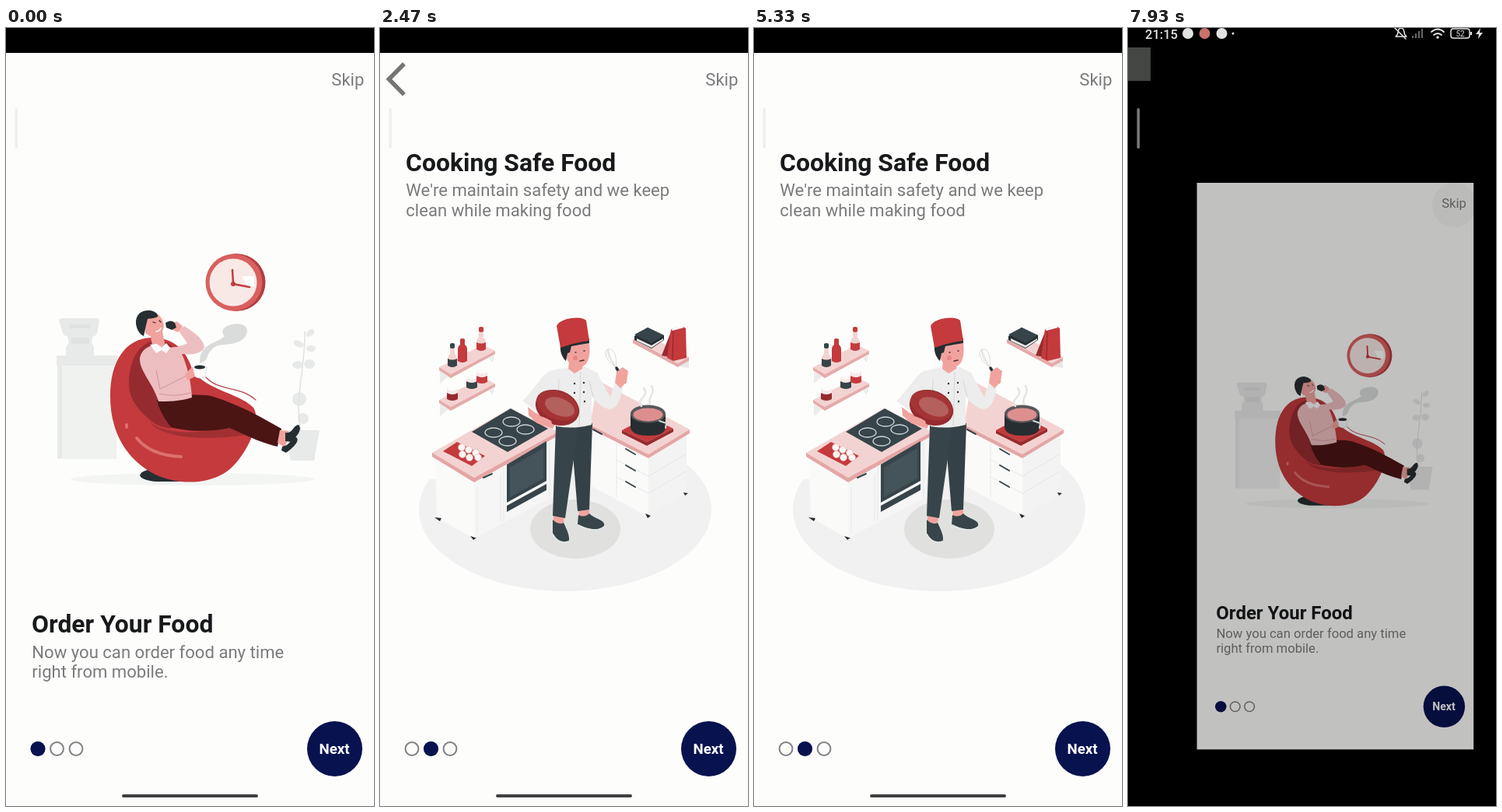
Animation, 473 px wide and 1000 px high, one loop 8000 ms. Source, as an HTML page:

```html
<!DOCTYPE html>
<html lang="en">
<head>
<meta charset="utf-8">
<title>Food app onboarding</title>
<style>
html,body{margin:0;width:100%;height:100%;overflow:hidden;background:#000}
svg{display:block;width:100%;height:100%;font-family:Roboto,Arial,sans-serif}
.title{font-size:31.85px;font-weight:700;fill:#18191b}
.sub{font-size:22.1px;fill:#7b7b7c}
.red{fill:#c43a3d}.deep{fill:#962b2f}.dark{fill:#37454a}.ink{fill:#262e31}
.skin{fill:#f0a39e}.rose{fill:#f3d3d2}.pale{fill:#e8eae9}.white{fill:#fafaf9}
.line{fill:none;stroke-linecap:round;stroke-linejoin:round}
</style>
</head>
<body>
<svg viewBox="0 0 473 1000" preserveAspectRatio="none">
<defs>
<clipPath id="win"><path d="M0 32h473v968h-473z"/></clipPath>
<g id="pane"><path class="white" d="M0 0h21v36h-21z"/><path class="line" stroke="#b5585b" stroke-width="1.300" d="M0 36V0h21v36M7 2v34M14 2v34"/></g>
<g id="balcony"><path fill="#eadddc" d="M-9 35l9-5h29l-4 11-6 5z"/><path class="line" stroke="#6a4547" stroke-width=".8" d="M-9 20h38M-9 33h38M-9 20v13m5-13v13m5-13v13m5-13v13m5-13v13m5-13v13m5-13v13m5-13v13m3-13v13"/></g>
<g id="burner"><ellipse rx="11" ry="6" fill="none" stroke="#cdd4d5" stroke-width="1.300"/></g>
<g id="bottle"><path class="rose" d="M-6 9V0q0-4 3-6v-7h6v7q3 2 3 6v9q-6 4-12 0z"/><path d="M-6 9V0q6 3 12 0v9q-6 4-12 0zM-3-14q3 2 6 0v-5q-3-2-6 0z"/></g>
<g id="jar"><path d="M-7 6V-7h14V6q-7 4-14 0z"/><ellipse cy="-7" rx="7" ry="3.500" class="white"/><path fill="#f6e9e8" d="M-7-7q7 5 14 0v5q-7 4-14 0z"/></g>
<g id="shelf"><path class="rose" d="M0 29 56 0 72 8 15 38z"/><path fill="#e5aaa9" d="M0 29 15 38 72 8v4L15 43 0 33z"/><path fill="#ebeceb" d="M1 34l11 7-11 9zM64 17l7-4-2 10z"/></g>
</defs>

<g id="app" clip-path="url(#win)">
<path fill="#fdfefc" d="M0 32h473v968h-473z"/>

<g id="page0">
<ellipse cx="240" cy="580" rx="157" ry="8" fill="#f3f5f3"/>
<path fill="#f0f2f0" d="M66 424h76v130h-76z"/>
<path class="pale" d="M65 421h78v13h-78zM66 434h6v119h-6zM68 376q0-3 4-3h43q5 0 5 4l-3 15q-1 4-5 4l-2 8 3 6v11H77v-11l4-6-2-8q-5 0-6-4z"/>
<path fill="#dfe2e0" d="M82 381h26v5h-26zM84 398h23v8h-23z"/>
<g class="pale"><path d="M358 517h45l-7 39h-30z"/><circle cx="377" cy="477" r="9"/><circle cx="382" cy="502" r="7"/>
<ellipse cx="376" cy="406" rx="7" ry="4" transform="rotate(25 376 406)"/><ellipse cx="391" cy="392" rx="6" ry="4" transform="rotate(-40 391 392)"/><ellipse cx="375" cy="433" rx="7" ry="5"/><ellipse cx="390" cy="432" rx="7" ry="6"/><ellipse cx="392" cy="412" rx="6" ry="4"/></g>
<path class="line" stroke="#dfe3e0" stroke-width="1.500" d="M379 518C370 480 385 435 384 390"/>
<ellipse cx="296" cy="327" rx="37.500" ry="37" fill="#b23d40"/><circle cx="293" cy="327" r="36.500" fill="#d9605f"/>
<circle cx="292" cy="327" r="30.500" fill="#f8e8e6"/><path fill="#fff" d="M303 319h16v13h-9z"/>
<path class="line" stroke="#c13c40" stroke-width="2.500" d="M291 311l1 18 21 4"/><circle cx="292" cy="329" r="3" fill="#c13c40"/>
<path fill="#d9dcda" d="M249 431C248 405 269 407 281 396 271 386 290 378 303 381 316 385 309 401 297 404 283 409 271 404 264 414 258 418 261 428 249 431z"/>
<path class="ink" d="M172 575c3-9 20-10 58-4l5 12h-43q-18-2-20-8z"/>
<path class="red" d="M134 473c0-44 19-74 53-75 28 0 45 15 53 43 21 26 59 28 78 47 11 17-7 57-28 77-25 23-68 23-98 9-39-20-58-56-58-101z"/>
<path class="deep" d="M158 456c1-32 14-52 36-55 18 1 34 18 40 40l-8 70c-12 7-32 2-42-8-17-15-26-28-26-47z"/>
<path class="deep" d="M185 506c19 20 79 14 110 5 8 2 15 6 24 10-44 9-119 10-134-15z" opacity=".75"/>
<path class="line" stroke="#dc706f" stroke-width="4" d="M168 527q17 22 57 24M155 510v3"/>
<path class="line" stroke="#b8494b" stroke-width="1.300" d="M257 449c18 19 42 10 64 29"/>
<path fill="#4b1514" d="M194 478c26-6 55-9 73-4 34 11 57 24 87 41l-5 23c-29-7-44-17-62-24-31 7-62 3-75-1q-15-19-18-35z"/>
<path class="skin" d="M352 517l11 1 1 8-6 13-9-6z"/>
<path class="ink" d="M359 520c10 2 9-9 17-10 6 7-4 16-9 22l-8-1zM355 538c12-2 9-10 18-12 6 5-6 15-13 20l-6-3z"/>
<path class="skin" d="M185 391l16-1 4 19-9 7-8-8z"/>
<path fill="#edbec0" d="M172 424c3-13 15-18 27-16 8 4 25 3 34-3l-12-17 8-5c15 9 25 18 26 27-4 10-18 10-29 9 8 17 12 38 13 56-17 5-31 5-43 5-7-24-25-39-24-56z"/>
<path class="white" d="M185 407l9-1 6 5 6-6 5 6-5 7-6-4-7 4z"/>
<path class="line" stroke="#ce9398" d="M193 440l5 24 34-17M197 470q20 5 40-1"/>
<path class="skin" d="M230 445l9-9 9-1-3 12-12 6zM212 382l7-5 8 6-6 8-7-3z"/>
<path class="white" stroke="#dcd8d7" stroke-width=".8" d="M240 436q9-5 18 0l-2 12q-7 4-13 0z"/><ellipse cx="249" cy="436" rx="7" ry="2.500" class="ink"/>
<path class="skin" d="M177 370c10-10 25-2 26 13-1 13-14 18-24 9z"/>
<path class="ink" d="M167 380c-1-13 9-18 18-17 7 1 11 5 10 8-6 3-10 2-13 3l-2 8-3 14c-6-3-9-9-10-16zM205 379q7-5 12 0l2 6-6 3-7-3z"/>
<path class="line" stroke="#fff" stroke-width="1.500" d="M193 390q4 0 6-4"/><path class="line" stroke="#3d2929" stroke-width="1.300" d="M189 378l3 1M197 376l2 2"/>
<text class="title" x="33.100" y="777">Order Your Food</text>
<text class="sub" x="33.300" y="809.500">Now you can order food any time</text><text class="sub" x="33.300" y="835">right from mobile.</text>
</g>

<g id="page1">
<ellipse cx="238" cy="619" rx="188" ry="105" fill="#f0f1f0"/><path fill="#fdfefc" d="M40 500h395v50l-90 25-105-30-125 35-75 0z"/>
<ellipse cx="251" cy="644" rx="58" ry="38" fill="#e0e1df"/>
<use href="#shelf" x="76" y="407"/><use href="#shelf" x="76" y="449"/>
<use href="#bottle" x="93" y="425" class="dark"/><use href="#bottle" x="106" y="419" class="red"/><path class="red" d="M100 422v-9q0-4 3-6v-5h6v5q3 2 3 6v9z"/><use href="#bottle" x="130" y="404" class="red"/>
<use href="#jar" x="93" y="471" class="deep"/><use href="#jar" x="118" y="456" class="dark"/><use href="#jar" x="131" y="449" class="red"/>
<path class="rose" d="M325 400l15-7 57 30-14 8z"/><path fill="#e5aaa9" d="M325 400l58 31 14-8v5l-14 8-58-31z"/><path fill="#e7e9e8" d="M384 435l13-7v9z"/>
<path class="ink" d="M327 396l17-11 21 10v6l-16 11-22-11z"/><path fill="#e7eae9" d="M330 399l19 9 15-9v2l-15 10-19-9z"/><path class="dark" d="M327 394l17-9 21 10-16 10z"/>
<path class="deep" d="M362 421l13-33 5-3-8 38z"/><path class="red" d="M369 424l5-37 16-3 3 2 1 38-17 4z"/><path class="white" d="M374 387l13-4 4 2-15 4z"/><path class="line" stroke="#8a2629" d="M377 390l-1 36"/>

<path class="white" d="M271 511l74 37v80l-73-39z"/><path fill="#f2f3f2" d="M345 548l49-29v80l-49 29z"/>
<path class="rose" d="M280 453l118 63-53 32-75-38z"/><path fill="#e5a5a5" d="M270 510l75 38 53-32v5l-53 32-75-38z"/>
<path class="line" stroke="#e5e7e6" d="M304 533v70M304 555l41 21 48-28M304 577l41 21 48-28"/>
<path class="line" stroke="#38464a" stroke-width="2" d="M316 541l12 7M316 562l12 7M316 583l12 7M274 516l11 6"/>
<path class="ink" d="M341 624l7 3-4 3zM390 597l6 1-4 3z"/>
<path class="red" d="M311 517l34-18 32 16-34 17z"/><path class="deep" d="M311 517l32 15 34-17v4l-34 18-32-16z"/>
<path class="ink" d="M322 496v18q2 10 23 10t22-10v-18z"/><ellipse cx="344.500" cy="496" rx="22.500" ry="11.500" fill="#59585b"/><ellipse cx="344.500" cy="497" rx="19" ry="8.500" fill="#dd8f8e"/>
<path class="line" stroke="#e3e5e4" stroke-width="2.500" d="M336 486c-9-8 12-13 3-23M347 483c-4-9 8-13 2-23"/><path class="line" stroke="#d2d6d5" stroke-width="2" d="M359 505l9 3-1 6"/>

<path class="white" d="M71 550l50 28v78l-48-26z"/><path fill="#f5f6f5" d="M121 578l107-57v78l-107 57z"/>
<path class="rose" d="M67 546l100-57 62 30-108 59z"/><path fill="#e5a5a5" d="M67 546l54 32 108-59v5l-108 60-54-33z"/>
<path class="line" stroke="#e6e8e7" d="M159 563v70M218 532v70M125 590v59M155 574v60"/>
<path class="dark" d="M118 519l50-30 48 26-52 30zM163 561l51-30v51l-51 28zM163 614l51-28v8l-51 28z"/><path fill="#44545a" d="M167 565l43-25v39l-43 24z"/>
<use href="#burner" x="146" y="520"/><use href="#burner" x="169" y="506"/><use href="#burner" x="164" y="531"/><use href="#burner" x="187" y="516"/>
<path class="red" d="M81 544l18-12 36 18-17 13z"/><g fill="#fff7f5" stroke="#ddaaa9" stroke-width=".6"><circle cx="105" cy="539" r="4.500"/><circle cx="114" cy="542" r="4.500"/><circle cx="123" cy="546" r="4.500"/><circle cx="106" cy="548" r="4.500"/><circle cx="115" cy="552" r="4.500"/><circle cx="126" cy="552" r="4.500"/></g>
<path class="line" stroke="#38464a" stroke-width="2" d="M133 578l11-5"/><path class="ink" d="M70 629l9 1-2 4zM116 653l6 2 2 0-4 3z"/>

<path class="skin" d="M223 624h14l-1 13-13 1zM255 615h13l2 14-14 1z"/>
<path fill="#344146" d="M245 512l28-4-4 111-15 2z"/><path class="dark" d="M226 511l29 1-17 118-16-3z"/>
<path class="dark" d="M222 632q7 7 14 4c5 10 9 20 6 24q-13 4-20-11zM255 626q8 4 14-2c8 8 21 8 19 16-8 8-24 3-34-2z"/>
<path class="line" stroke="#e3e8e8" stroke-width="1.500" d="M222 651q8 13 20 9M255 639q21 11 33 2"/>
<path fill="#ecedec" d="M230 438l33-3 16 8 17 32 6-20 10 7c-3 17-7 27-17 28-10-2-17-9-23-17v37q-22 6-45 2l-3-27-22 9-19-15c14-12 24-32 35-38z"/>
<path class="line" stroke="#d3d6d5" d="M202 494l27-22 1-20M274 474l-5-20M258 443l-2 68"/>
<g class="ink"><circle cx="250" cy="457" r="1.200"/><circle cx="262" cy="456" r="1.200"/><circle cx="250" cy="469" r="1.200"/><circle cx="262" cy="468" r="1.200"/><circle cx="251" cy="481" r="1.200"/><circle cx="263" cy="480" r="1.200"/></g>
<path class="skin" d="M243 428l18-2-1 12-10 6-8-6z"/><path class="skin" d="M238 410l31-6c2 17-1 30-12 32-10 0-16-6-18-14-3-4-3-9-1-12z"/>
<path class="ink" d="M232 407l37-8v6l-23 4-2 8-3 1-2 10c-5-5-8-12-7-21z"/><path class="red" d="M227 383c4-10 31-14 38-7l4 26q-19 2-37 9z"/>
<path class="line" stroke="#51292b" stroke-width="1.500" d="M251 417h1M262 415h1M257 428l5-1"/><circle cx="251" cy="424" r="3" fill="#ea8583"/>
<path class="line" stroke="#d8dad9" d="M303 436c-12-8-17-20-10-23s12 9 10 23c-4-6-9-17-10-23m10 23c-9-11-11-17-10-22"/><path class="line" stroke="#293236" stroke-width="3.500" d="M304 437l11 18"/>
<path class="skin" d="M302 456l2-14 8-6 7 5-2 14-8 8z"/>
<path class="skin" d="M190 487l9 7 27 14-4 7-20-7-11-10z"/>
<ellipse cx="228" cy="488" rx="29" ry="22" transform="rotate(22 228 488)" class="deep"/><ellipse cx="228" cy="485" rx="28" ry="18" transform="rotate(22 228 485)" fill="#a43436"/><ellipse cx="231" cy="487" rx="20" ry="11" transform="rotate(22 231 487)" fill="#b4605d"/>
<path class="skin" d="M198 498q11 0 22 7l2 7q-13 0-24-7z"/>
<text class="title" x="33.100" y="184">Cooking Safe Food</text>
<text class="sub" x="33.300" y="216">We're maintain safety and we keep</text><text class="sub" x="33.300" y="241.500">clean while making food</text>
</g>

<g id="page2">
<path fill="#f0f2f0" d="M60 490l15-17 30 10v95H60zM262 470l25-10 18 20 25-10 25-18 25 13 17-11 22 30v75l-157 40z"/>
<path class="pale" d="M52 398l10-17 6 3 9-17 9 10-5 14-14-3zM222 402l7-14 8 2 6-5 10 17zM362 381l14-8 9 9 10 2zM394 391l13-15 8 3 5-11 9 12 2 20-15-9z"/>
<path fill="#e7e9e7" d="M110 690l60 20 95-62-40-25zM268 718c8-24 83-60 142-76 20 9-62 72-113 79q-24 5-29-3z"/>
<path class="line" stroke="#1d2022" stroke-width="2" d="M56 552V427c0-15 20-20 23-5v4M418 580V428c0-18-21-23-23-5v4"/>
<g class="dark"><path d="M74 426h9l1 6H73zM75 440h7l-1 4h-5zM391 426h8l1 6h-10zM392 440h7l-1 4h-5z"/></g><path class="rose" d="M74 432h9l-1 8h-7zM391 432h8l-1 8h-6z"/>
<path class="line" stroke="#42292b" stroke-width="2" d="M58 560v78"/><path fill="#7f2428" d="M60 548l5 5 6-1-2 9 8 2-4 8 7 2-6 8 5 5-6 4 3 8-9 1-2 6-7-3-7 3-3-5-9-1 4-8-6-4 6-4-4-8 7-2-3-8 7-1-1-9 7 1z"/><path class="red" d="M53 632l6 5 6-3-3 8h-7z"/>
<path fill="#dc898b" d="M78 465l79 45 4 160-81-46z"/><path fill="#d17b7e" d="M157 510l105-60v179l-101 41z"/>
<path class="deep" d="M80 614l80 44v12l-80-46zM160 658l102-43v14l-101 41z"/>
<path fill="#eaa6a6" d="M78 465l105-60 79 45-105 60z"/><path fill="#7c1f23" d="M91 465l92-53 66 38-92 52z"/><path fill="#9a3034" d="M91 465l92-53 66 38-7 4-59-34-85 49z"/>
<path class="line" stroke="#f0bcbc" stroke-width="3" d="M78 465l79 45 105-60"/><path class="white" d="M91 465l13-8 13 7-13 8z"/>
<g transform="matrix(1 .57 0 1 109 492)"><use href="#pane"/><use href="#balcony"/><use href="#pane" y="47"/><use href="#balcony" y="47"/></g>
<g transform="matrix(1 -.57 0 1 179 513)"><use href="#pane"/><use href="#balcony"/><use href="#pane" y="47"/><use href="#balcony" y="47"/></g>
<g transform="matrix(1 -.57 0 1 226 485)"><use href="#pane"/><use href="#balcony"/><use href="#pane" y="47"/><use href="#balcony" y="47"/></g>
<path class="white" d="M97 595l14 8v17l-14-8zM172 617l10-6v18l-10 5zM197 604l12-6v18l-12 6z"/>
<path class="deep" d="M221 585l23-13v37l-23 12z"/><path class="dark" d="M224 587l16-8v26l-16 9z"/><path fill="#f0efee" d="M222 620l22-12 20 21-25 13-15-8z"/><path class="line" stroke="#d8d6d5" d="M223 625l23-12M227 631l24-12M232 637l25-13"/>
<path class="deep" d="M136 390c1-19 21-29 37-26 13 3 19 14 17 29-3 20-14 35-24 55-12-15-31-34-30-58z"/><path class="red" d="M142 396c0-17 16-31 31-30 13 1 18 13 16 26-3 18-14 34-23 56-8-15-24-32-24-52z"/>
<ellipse cx="168" cy="392" rx="10.500" ry="15" transform="rotate(25 168 392)" fill="#7b2226"/><ellipse cx="169" cy="395" rx="7.500" ry="12" transform="rotate(25 169 395)" class="white"/>
<path class="ink" d="M72 649l48 23v30l-48-21zM93 618l25 13v31l-25-13z"/><path class="dark" d="M120 672l31-17v31l-31 16zM118 631l27-13v29l-27 15z"/><path fill="#43525a" d="M72 649l36-18 43 24-31 17zM93 618l26-14 26 14-27 13z"/>
<path class="red" d="M103 612l7-4 26 14v7l-7 3v-7zM128 656l10 5v7l-7-3z"/><path class="white" d="M79 666l11 5v10l-11-5zM98 634l8 4v9l-8-4z"/>
<path class="line" stroke="#bac3c5" d="M126 690v-8m4 6v-8m4 6v-8M125 650v-8m4 6v-8m4 6v-8"/>
<path fill="#f7eeed" stroke="#d87f7f" stroke-width="3" d="M151 698l25-10 18-18 25-11 40 21-25 10-17 19-26 11z"/><path class="line" stroke="#cdcfcd" stroke-width="1.500" d="M163 699l36-20 15-11M175 706l37-20 27-17M187 714l32-19 28-16M176 688l40 21M194 671l42 20"/>
<path fill="#b23b3e" d="M278 405q0-5 4-7l56-28q7-1 8 4v60q0 6-5 8l-39 18 1 10-12-8-8 4q-5-1-5-6z"/><path fill="#d8605f" d="M283 407q0-5 4-7l53-27q6-2 6 4v57q0 6-5 8l-39 18 1 10-12-8-3 3q-5-1-5-6z"/>
<path class="white" d="M286 404l57-29v57l-57 29z"/><text transform="matrix(.6 -.33 0 1 287.500 418)" font-size="10" font-weight="700" fill="#2c3538">DELIVERY ADDRESS</text>
<path fill="#e9b1b0" d="M288 424l31-16v31l-31 16z"/><path class="line" stroke="#fff" stroke-width="2" d="M288 440l31-15M297 420l7 27M311 412l-12 36"/><path class="ink" d="M298 430q3-7 7-2 2 4-4 10z"/><path class="line" stroke="#cfd2d1" stroke-width="1.200" d="M323 408l17-9M323 414l17-9M323 420l17-9M323 426l17-9M323 432l17-9"/>
<path fill="#9d2b2e" d="M331 527l41-2-1 55-5 31-13-2-3-48-4 50-13 1z"/><path class="line" stroke="#7c2124" d="M351 540l-1 25"/>
<path class="skin" d="M341 455h21l1 14-5 9 1 5-13 1-1-9q-6-8-4-20z"/><path class="dark" d="M336 453c1-8 12-10 20-9 8 1 11 6 11 11l-5 3-8-3-18 1z"/><path class="line" stroke="#612f30" stroke-width="1.300" d="M345 461h1M354 461h1M347 470l4 0"/>
<path class="dark" d="M330 483q8-6 15-8l15 1c12 2 20 8 21 17 1 18-3 24-13 28l2 11q-19 7-38 1l2-22-5-17z"/><path fill="#4a595e" d="M344 516l22-5 8 6-24 12-9-6z"/><path class="skin" d="M340 516l9-3 3 13-9-1z"/>
<path class="ink" d="M282 494l26 13v32l-26-12z"/><path class="dark" d="M308 507l25-14v32l-25 14z"/><path fill="#43525a" d="M282 494l26-14 25 13-25 14z"/><path class="red" d="M294 487l6-3 25 13v7l-6 3v-7z"/><path class="white" d="M287 513l9 4v9l-9-4z"/><path class="line" stroke="#b9c2c4" d="M313 531v-8m4 6v-8m4 6v-8"/>
<ellipse cx="290" cy="700" rx="16" ry="21" transform="rotate(24 290 700)" class="ink"/><ellipse cx="289" cy="700" rx="9" ry="13" transform="rotate(24 289 700)" fill="#e5e9e9"/><ellipse cx="289" cy="700" rx="4" ry="6" transform="rotate(24 289 700)" class="dark"/>
<ellipse cx="390" cy="645" rx="13" ry="17" transform="rotate(25 390 645)" class="ink"/><ellipse cx="389" cy="645" rx="6" ry="9" transform="rotate(25 389 645)" fill="#e4e8e8"/>
<path class="deep" d="M304 612l27 9 6 45c14 2 30-14 32-25l6-17 27-11c11 4 16 12 16 19l-20 5q-18 5-23 22c-13 9-29 20-45 29q-19 7-27-4z"/>
<path class="red" d="M291 630c1-15 19-22 32-14l11 15c7 22-2 36-9 48l-19 11c-8-4-12-11-13-22zM337 633c13-15 43-22 59-19 13 0 22 9 22 19q-17-2-30 5c-8 7-9 13-12 19-12 7-31 2-39-6zM270 682c6-14 24-20 39-14l9 12q-19-6-27 2-9 0-21 0z"/>
<path fill="#d8605f" d="M294 632q3-13 17-14l15 11q-16-9-32 3zM346 630q17-12 48-10-24 2-41 17z"/><path class="white" d="M294 640q7-2 9 8l-4 8q-6-5-5-16zM310 654q6 0 5 8-5 2-5-8z"/>
<path class="line" stroke="#293236" stroke-width="2" d="M316 613c-9-5-12-18-21-30M303 600l32 17"/><ellipse cx="292" cy="578" rx="6" ry="4" transform="rotate(35 292 578)" class="dark"/><path class="red" d="M306 600l24 4 8 13-9 9-19-10z"/>
<path class="ink" d="M336 615q17-10 34-8l8 11q-13 13-31 13z"/>
<path class="dark" d="M358 577l30 15v28l-30-16z"/><path class="ink" d="M388 592l23-13v28l-23 13z"/><path fill="#43525a" d="M358 577l18-13q20 3 35 14l-23 14z"/><path class="red" d="M358 589l30 15 23-13v4l-23 13-30-15z"/><text transform="matrix(.6 -.33 0 1 388 615)" font-size="7" font-weight="700" fill="#dfe5e5">DELIVERY</text>
<text class="title" x="33.100" y="184">Quick delivery</text>
<text class="sub" x="33.300" y="216">Orders your favourite meals will be</text><text class="sub" x="33.300" y="241.500">immediately deliver</text>
</g>

<circle id="ripple" cx="440" cy="70" r="26"/>
<path id="back" class="line" stroke="#757575" stroke-width="5.500" style="stroke-linecap:butt;stroke-linejoin:miter" d="M31 46 11.500 65.800 31 85.600"/>
<text id="skip" class="sub" x="418.300" y="74">Skip</text>
<g fill="none" stroke="#808084" stroke-width="2"><circle cx="41" cy="926.500" r="8.400"/><circle cx="65.500" cy="926.500" r="8.400"/><circle cx="90" cy="926.500" r="8.400"/></g>
<rect id="worm" y="917" height="19" rx="9.500" fill="#07124f"/>
<circle cx="422.500" cy="926.500" r="35.500" fill="#07124f"/>
<text id="label" x="422" y="933" text-anchor="middle" font-size="18.700" font-weight="700" fill="#fff">Next</text>
<path id="dim" d="M0 32h473v968h-473z"/>
</g>

<rect id="handle" x="11.500" y="103" width="3.500" height="52" rx="1.700"/>
<rect id="home" x="149" y="985" width="175" height="4" rx="2" fill="#414141"/>
<g id="status" fill="#e2e4e2">
<path fill="#434643" d="M0 25h29v43H0z"/>
<text x="22" y="13.500" font-size="16.500" font-weight="500">21:15</text>
<circle cx="77" cy="7" r="7"/><circle cx="98.500" cy="7" r="7" fill="#c9736c"/><circle cx="120.500" cy="7" r="7"/><circle cx="135" cy="7" r="1.500"/>
<path class="line" stroke="#e2e4e2" stroke-width="1.500" d="M344 11q3-2 3-6 1-5 4-5t4 5q0 4 3 6zM343 0l14 14"/>
<path fill="#666" d="M365 10h2v3h-2zM369 7h2v6h-2zM373 4h2v9h-2zM377 1h2v12h-2z"/>
<path class="line" stroke="#e2e4e2" stroke-width="1.800" d="M390 5q8-7 16 0M393 9q5-4 10 0"/><circle cx="398" cy="12" r="1.700"/>
<rect x="415" y="1" width="24" height="12" rx="3" fill="none" stroke="#e2e4e2" stroke-width="1.500"/><path d="M440 5h2v4h-2z"/><text x="427" y="11" text-anchor="middle" font-size="10">52</text>
<path d="M453 0l-6 8h4l-1 6 6-8h-4z"/>
</g>
</svg>
<script>
const LOOP = 8000, TICK = 130, W = 473, PITCH = 485, MID_X = 236.5, MID_Y = 499;
const SLIDE = 300, GAP = 24.5, DOT = 19;
// slide start, from page, to page
const slides = [[330,0,1],[894,1,2],[1830,2,1],[3260,1,0],[4175,0,1],[5330,1,0]];

const $ = id => document.getElementById(id);
const clamp = u => Math.min(1, Math.max(0, u));
const easeOut = u => 1 - (1 - u) ** 3;
const easeInOut = u => u * u * (3 - 2 * u);
const spring = ms => { const a = .0173 * Math.max(0, ms); return 1 - (1 + a) * Math.exp(-a); };
const show = (id, on) => $(id).setAttribute('visibility', on ? 'visible' : 'hidden');
const set = (id, attrs) => { for (const k in attrs) $(id).setAttribute(k, attrs[k]); };

function placePage(i, scroll) {
  const pos = i - scroll, s = Math.max(.85, 1 - Math.abs(pos));
  const nudge = Math.sign(pos) * (1 - s) * (1000 / 4 - W / 2);
  set('page' + i, {
    opacity: Math.abs(pos) >= 1 ? 0 : .5 + (s - .85) / .3,
    transform: `translate(${MID_X + pos * PITCH + nudge} ${MID_Y}) scale(${s}) translate(${-MID_X} ${-MID_Y})`
  });
}

function draw(t) {
  let scroll = 0, page = 0, x = 31.5, width = DOT;
  for (const [start, from, to] of slides) {
    const stretch = spring(t - start - 10), settle = spring(t - start - 161);
    scroll += (to - from) * easeOut(clamp((t - start) / SLIDE));
    if (t >= start - 20) page = to;
    x += to > from ? GAP * settle : -GAP * stretch;
    width += GAP * (stretch - settle);
  }
  for (let i = 0; i < 3; i++) placePage(i, scroll);
  set('worm', { x, width });
  show('back', page > 0);
  show('skip', page < 2);
  $('label').textContent = page === 2 ? 'Start' : 'Next';

  const press = clamp((t - 6370) / 400);
  show('ripple', t >= 6370);
  set('ripple', { r: 26 + 12 * press, opacity: .08 - .05 * press });

  const k = easeInOut(clamp((t - 7400) / 530));
  set('app', { transform: `translate(${88.4 * k} ${175 * k}) scale(${1 - .2474 * k})` });
  set('dim', { opacity: .24 * k });
  set('handle', { fill: k ? '#777977' : '#eff0ee' });
  show('home', !k);
  show('status', k > 0);
}

function frame() {
  const t = performance.now() % LOOP;
  draw(Math.floor(t / TICK) * TICK);
  requestAnimationFrame(frame);
}
frame();
</script>
</body>
</html>
```
